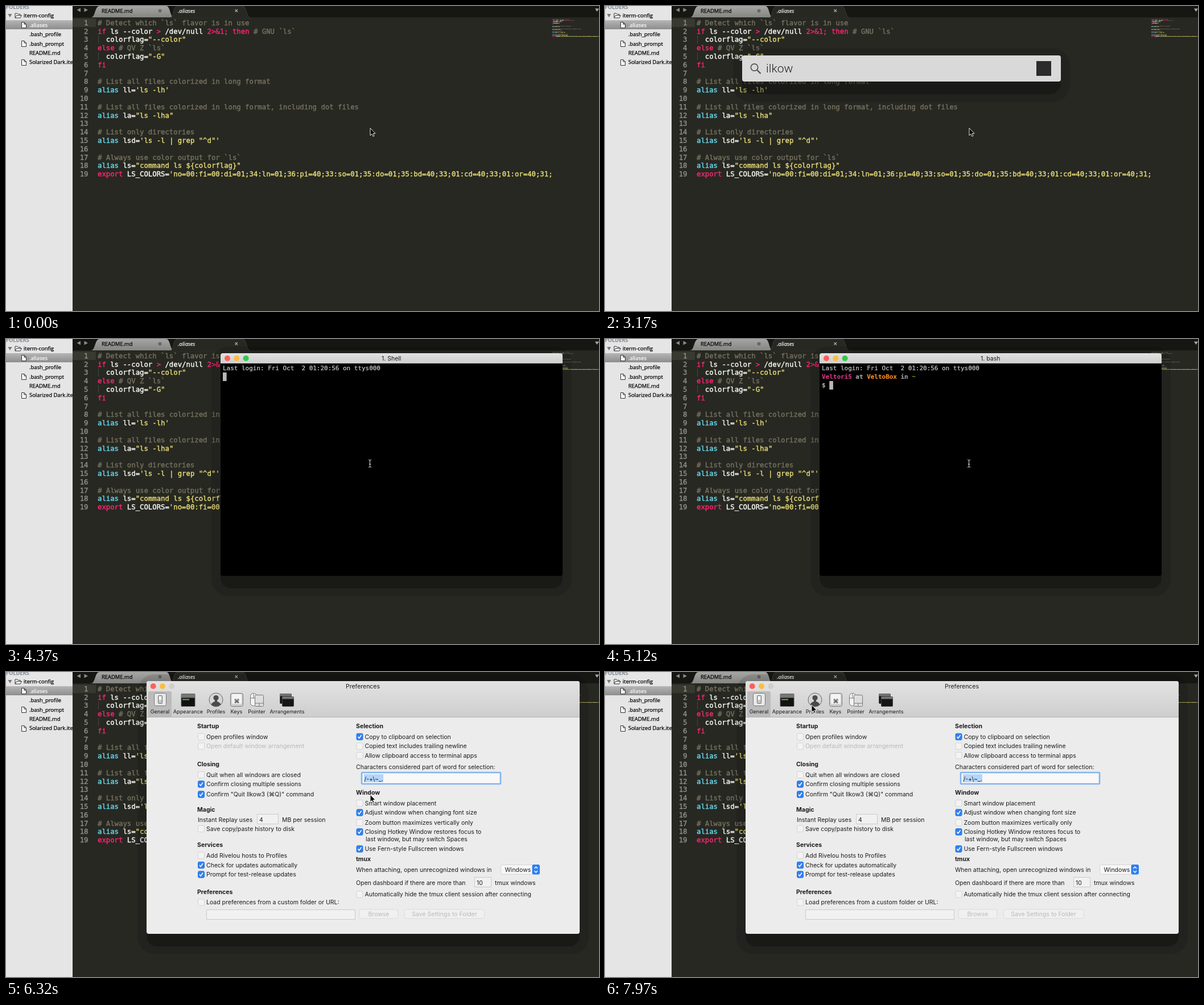
Recreate the animation shown at these times as an HTML page. Size 1042 px wide and 537 px high, loop 8 s.

```html
<!DOCTYPE html>
<html lang="en">
<head>
<meta charset="utf-8">
<title>Editor, search, terminal and preferences</title>
<style>
html, body { margin: 0; width: 100%; height: 100%; overflow: hidden; background: #272822; }
svg { position: absolute; left: 0; top: 0; }
text { white-space: pre; }
text, tspan { fill: var(--ink); stroke: var(--ink); stroke-width: var(--weight, 0); }
.code { font: 12.31px "DejaVu Sans Mono", monospace; --ink: #f8f8f2; }
#editor { --weight: .4px; }
#map { --weight: 2px; }
.num { --ink: #8f908a; text-anchor: end; }
.note { --ink: #75715e; }
.str { --ink: #e6db74; }
.key { --ink: #f92672; }
.cmd { --ink: #66d9ef; }
.side { font: 9.4px "Open Sans", sans-serif; --ink: #000; --weight: .25px; }
.pick { --ink: #fff; }
.label { font-weight: 600; --ink: #7b838c; }
.tab { font-style: italic; --ink: #f4f4f4; }
.term { font: 10.96px "DejaVu Sans Mono", monospace; --ink: #cfcfcf; --weight: .2px; }
.ui { font: 10.5px Inter, sans-serif; --ink: #1c1c1c; }
.tool { font-size: 9.1px; }
.head { font-weight: 700; }
.off { --ink: #b9b9b9; }
.mid { text-anchor: middle; }
#query { position: absolute; left: 283px; top: 97px; height: 26px;
  font: 300 21px/26px Roboto, sans-serif; color: #222; white-space: pre; }
#query mark { display: inline-block; height: 26px; background: #a9c8e8; color: inherit; }
#query.empty { color: #a0a0a0; }
#caret { position: absolute; left: 283px; top: 97px; width: 1px; height: 26px; background: #111; }
</style>
</head>
<body>
<svg id="stage" width="1042" height="537" viewBox="0 0 1042 537"></svg>
<div id="query"></div>
<div id="caret"></div>
<script>
const $ = id => document.getElementById(id);
const text = (x, y, s, cls = 'ui') => `<text x="${x}" y="${y}" class="${cls}">${s}</text>`;
const rect = (x, y, w, h, fill, rx = 0, more = '') =>
  `<rect x="${x}" y="${y}" width="${w}" height="${h}" fill="${fill}" rx="${rx}" ${more}/>`;
const path = (d, fill, more = '') => `<path d="${d}" fill="${fill}" ${more}/>`;
const dot = (x, y, r, fill, more = '') => `<circle cx="${x}" cy="${y}" r="${r}" fill="${fill}" ${more}/>`;
const fade = (id, top, end) => `<linearGradient id="${id}" x2="0" y2="1">
  <stop stop-color="${top}"/><stop offset="1" stop-color="${end}"/></linearGradient>`;
const shadow = (x, y, w, h) =>
  rect(x - 16, y - 12, w + 32, h + 48, '#000', 30, 'opacity=".12"') +
  rect(x, y, w, h + 22, '#000', 18, 'opacity=".28"');
const lights = (x, y, last) => ['#fc605c', '#fdbc40', last]
  .map((c, i) => dot(x + i * 16.3, y, 5, c)).join('');

const lines = [
  '# Detect which `ls` flavor is in use',
  'if ls --color > /dev/null 2>&1; then # GNU `ls`',
  '  colorflag="--color"',
  'else # QV Z `ls`',
  '  colorflag="-G"',
  'fi',
  '',
  '# List all files colorized in long format',
  "alias ll='ls -lh'",
  '',
  '# List all files colorized in long format, including dot files',
  'alias la="ls -lha"',
  '',
  '# List only directories',
  `alias lsd='ls -l | grep "^d"'`,
  '',
  '# Always use color output for `ls`',
  'alias ls="command ls ${colorflag}"',
  "export LS_COLORS='no=00:fi=00:di=01;34:ln=01;36:pi=40;33:so=01;35:do=01;35:bd=40;33;01:cd=40;33;01:or=40;31;"
];
const tokens = /(#.*)|('.*|".*")|(\b(?:if|then|else|fi|export)\b|2>&1;|>)|(\balias\b)/g;
const paint = s => s.replace(tokens, (m, note, str, key) =>
  `<tspan class="${note ? 'note' : str ? 'str' : key ? 'key' : 'cmd'}">${m}</tspan>`);
const lineY = i => 33.7 + i * 14.81;

function editor() {
  const code = lines.map((s, i) => text(161, lineY(i), paint(s), 'code')).join('');
  const numbers = lines.map((s, i) => text(144.5, lineY(i), i + 1, 'code num')).join('');
  return rect(117, 0, 925, 537, '#272822') +
    rect(117, 22, 41, 15, '#383930') + numbers +
    path('M162.5 52v14M162.5 81v14', 'none', 'stroke="#46473f"') +
    `<g clip-path="url(#codeClip)"><g id="code">${code}</g></g>
    <use id="map" href="#code" transform="translate(942.3 20.6) scale(.11)"/>` +
    rect(117, 0, 925, 20, '#161713') +
    path('M149 20C158 20 155 0 165 0H281C290 0 287 20 296 20Z', 'url(#tab)') +
    path('M288 21C296 21 292 0 302 0H415C424 0 421 21 431 21Z', '#272822', 'stroke="#3b3c36"') +
    rect(117, 20, 925, 1.6, '#272822') +
    path('M131 3.5V10.5L124.5 7ZM137.5 3.5V10.5L144 7Z', '#8c8c88') +
    path('M1035 4.5H1042L1038.5 10Z', '#aaa') +
    text(168, 11.5, 'README.md', 'side') + dot(270.5, 8.5, 3, '#666') +
    text(302, 11.5, '.aliases', 'side tab') +
    path('M402.5 6L407 10.5M407 6L402.5 10.5', 'none', 'stroke="#aaa" stroke-width="1.3"');
}

function sidebar() {
  const page = y => path(`M27.5 ${y - 5}H32L35.5 ${y - 1.5}V${y + 5}H27.5ZM32 ${y - 5}V${y - 1.5}H35.5`,
    '#f6f6f6', 'stroke="#333"');
  const names = ['.aliases', '.bash_profile', '.bash_prompt', 'README.md', 'Solarized Dark.iterm'];
  return `<g clip-path="url(#sideClip)">` + rect(0, 0, 117, 537, '#e5e5e6') +
    rect(0, 25, 117, 16, 'url(#row)') +
    text(0, 4.5, 'FOLDERS', 'side label') +
    path('M3.5 14H10.5L7 20Z', '#777') +
    path('M16 21V13H20L21.5 14.5H25V16.5M16 21L18.5 16.5H27.5L25 21Z', '#f4f4f4', 'stroke="#333"') +
    text(31, 20.2, 'iterm-config', 'side') +
    names.map((s, i) => text(41, 36.7 + i * 16.4, s, i ? 'side' : 'side pick')).join('') +
    [33.5, 66.5, 99.5].map(page).join('') + '</g>';
}

function search() {
  return shadow(241, 87, 560, 46) + rect(241, 87, 560, 46, '#d9d9d9', 4) +
    dot(262.5, 108, 6.2, 'none', 'stroke="#555" stroke-width="1.7"') +
    path('M267 112.5L273.5 119', 'none', 'stroke="#555" stroke-width="2.4"') +
    rect(758, 97, 26, 26, '#2b2b2b', 0, 'id="icon"');
}

function terminal() {
  const bold = (ink, s) => `<tspan style="--ink:${ink};font-weight:700">${s}</tspan>`;
  const gray = s => bold('#a0a0a0', s);
  return shadow(377, 25, 601, 392) + rect(377, 25, 601, 392, '#000', 4) +
    path('M377 43V29Q377 25 381 25H974Q978 25 978 29V43Z', 'url(#bar)') +
    lights(389, 34, '#34c84a') +
    '<text id="title" x="660" y="38" class="ui"></text>' +
    text(381, 55, 'Last login: Fri Oct  2 01:20:56 on ttys000', 'term') +
    '<g id="prompt">' + text(381, 70, bold('#d33682', 'Veltori5') + gray(' at ') +
      bold('#f58a1f', 'VeltoBox') + gray(' in ') + bold('#6f9a1c', '~'), 'term') +
    text(381, 85, gray('$'), 'term') + '</g>' +
    rect(0, 0, 6.6, 15, '#b9b9b9', 0, 'id="block"');
}

function toolbar() {
  const thin = 'stroke="#777"';
  const pane = (x, y) => rect(x, y, 20, 17, '#161616', 1, 'stroke="#444"') + rect(x, y, 20, 4, '#777');
  const labels = [[270.5, 'General'], [320, 'Appearance'], [369, 'Profiles'], [405, 'Keys'],
    [440.5, 'Pointer'], [494, 'Arrangements']];
  return rect(250, 34, 41, 45, '#bcbbbc', 2) +
    labels.map(([x, s]) => text(x, 73.3, s, 'ui tool mid')).join('') +
    rect(260.5, 37.5, 21, 22, '#e9e9e9', 3, thin) + rect(267.5, 41.5, 7, 14, '#c4c4c4', 1, thin) +
    rect(269, 43, 4, 6, '#fff') +
    rect(308, 38.5, 24, 22, '#111', 1, 'stroke="#555"') + rect(308, 38.5, 24, 7, '#777') +
    rect(310, 47.5, 12, 2, '#5fae4e') +
    dot(369, 49, 12, '#d5d5d5', 'stroke="#666"') + dot(369, 45.5, 4.6, '#4a4a4a') +
    path('M360.5 57.5Q362 53 367 52V49H371V52Q376 53 377.5 57.5Q369 64 360.5 57.5Z', '#4a4a4a') +
    rect(394.5, 37.5, 22, 23, '#cfcfcf', 3, thin) + rect(397, 39, 17, 17, '#f4f4f4', 2) +
    text(405.5, 55, '⌘', 'ui mid') +
    rect(429.5, 37.5, 11, 22, '#f2f2f2', 5, thin) + path('M430 46H440M435 38V46', 'none', thin) +
    rect(437.5, 40.5, 15, 20, '#dedede', 2, thin) + path('M438 55H452M445 55V60', 'none', thin) +
    pane(481.5, 38.5) + pane(485.5, 43.5);
}

function preferences() {
  const box = (x, y, on, label, off) =>
    rect(x - 5.5, y - 5.7, 11, 11.4, on ? '#2f80f2' : '#f3f3f3', 2, `stroke="${on ? '#2a74e0' : '#d2d2d2'}"`) +
    (on ? path(`M${x - 3} ${y}L${x - 1} ${y + 2.7}L${x + 3} ${y - 3}`, 'none', 'stroke="#fff" stroke-width="1.5"') : '') +
    text(x + 9, y + 3.8, label, off ? 'ui off' : 'ui');
  const left = [[114, 0, 'Open profiles window'], [130.5, 0, 'Open default window arrangement', 1],
    [181, 0, 'Quit when all windows are closed'], [197.5, 1, 'Confirm closing multiple sessions'],
    [215.5, 1, 'Confirm "Quit Ilkow3 (⌘Q)" command'], [276, 0, 'Save copy/paste history to disk'],
    [323, 0, 'Add Rivelou hosts to Profiles'], [340, 1, 'Check for updates automatically'],
    [356.5, 1, 'Prompt for test-release updates'], [405.5, 0, 'Load preferences from a custom folder or URL:']];
  const right = [[114, 1, 'Copy to clipboard on selection'], [130.5, 0, 'Copied text includes trailing newline'],
    [147, 0, 'Allow clipboard access to terminal apps'], [231, 0, 'Smart window placement'],
    [247.5, 1, 'Adjust window when changing font size'], [265, 0, 'Zoom button maximizes vertically only'],
    [281.5, 1, 'Closing Hotkey Window restores focus to'], [311.5, 1, 'Use Fern-style Fullscreen windows'],
    [391.5, 0, 'Automatically hide the tmux client session after connecting']];
  const heads = [[336, 95, 'Startup'], [336, 162, 'Closing'], [336, 242, 'Magic'], [336, 304, 'Services'],
    [336, 387, 'Preferences'], [615, 95, 'Selection'], [615, 212, 'Window'], [615, 329, 'tmux']];
  const field = (x, y, w, h = 18) => rect(x + .5, y + .5, w - 1, h - 1, '#f1f1f1', 0, 'stroke="#cacaca"');
  const button = (x, w, s) => rect(x, 418, w, 16, '#f0f0f0', 3, 'stroke="#dadada"') +
    text(x + w / 2, 430, s, 'ui off mid');
  return shadow(247, 16, 761, 445) + rect(247, 16, 761, 445, '#ececec', 4) +
    path('M247 79V20Q247 16 251 16H1004Q1008 16 1008 20V79Z', 'url(#bar)') + rect(247, 79, 761, 1, '#b2b2b2') +
    lights(258.7, 25, '#cfcfcf') + text(627, 28.8, 'Preferences', 'ui mid') + toolbar() +
    heads.map(([x, y, s]) => text(x, y + 3.8, s, 'ui head')).join('') +
    left.map(r => box(343, ...r)).join('') + right.map(r => box(621.5, ...r)).join('') +
    text(632, 298, 'last window, but may switch Spaces') +
    text(337, 263.5, 'Instant Replay uses') + field(441, 250, 38) + text(445, 263.5, '4') +
    text(485, 263.5, 'MB per session') +
    text(615, 170.7, 'Characters considered part of word for selection:') +
    rect(625, 177, 244, 20, '#f8f8f8', 1, 'stroke="#85b4ee" stroke-width="2.6"') +
    rect(629, 180, 34, 14, '#b3d5fb') + text(629.5, 191.5, '/-+\\~_.') +
    text(615, 351.7, 'When attaching, open unrecognized windows in') +
    rect(869.5, 339.5, 68, 16.5, '#f7f7f7', 3, 'stroke="#d4d4d4"') + rect(924.5, 339, 13.5, 17.5, '#2f80f2', 3) +
    path('M928.5 346L931.2 343L934 346M928.5 350L931.2 353L934 350', 'none', 'stroke="#fff" stroke-width="1.4"') +
    text(876.5, 351.7, 'Windows') +
    text(615, 374.5, 'Open dashboard if there are more than') + field(823, 361, 30) + text(827, 374.5, '10') +
    text(859, 374.5, 'tmux windows') +
    field(352, 418, 262) + button(621, 68, 'Browse') + button(700, 141, 'Save Settings to Folder');
}

$('stage').innerHTML = `<defs>
  <clipPath id="codeClip"><rect x="118" y="21" width="842" height="516"/></clipPath>
  <clipPath id="sideClip"><rect width="117" height="537"/></clipPath>
  ${fade('tab', '#a5a5a3', '#858583')}${fade('row', '#b5b5b5', '#8d8d8d')}${fade('bar', '#e2e2e2', '#cecece')}</defs>
  <g id="editor">${editor()}</g>${sidebar()}
  <g id="search">${search()}</g><g id="terminal">${terminal()}</g><g id="prefs">${preferences()}</g>
  ${path('M0 0V13L3 10.2L5 14.6L7 13.7L5.1 9.3H9Z', '#000', 'id="arrow" stroke="#fff" stroke-width=".9"')}
  ${path('M637 212.5Q639.5 212.5 639.5 215V223.5Q639.5 226 637 226M642 212.5Q639.5 212.5 639.5 215M642 226Q639.5 226 639.5 223.5M638 220.5H641',
    'none', 'id="beam" stroke="#ddd"')}`;

// Each pointer stop: start time, x, y
const stops = [[0, 640, 215], [5570, 637, 215], [6020, 640, 215], [6320, 640, 216], [7070, 638, 224],
  [7220, 326, -7], [7370, 326, -30], [7670, 318, -12], [7820, 350, 37], [7970, 363, 58]];
// Each typing step: start time, letters typed so far
const typing = [[2420, 1], [2720, 2], [2870, 4], [3170, 5]];
const word = 'ilkow';
const latest = (list, t) => list.findLast(e => e[0] <= t);
const show = (id, on) => { $(id).style.display = on ? '' : 'none'; };

function setHTML(id, html) {
  const el = $(id);
  if (el.shown !== html) el.innerHTML = el.shown = html;
}

function tick() {
  const t = performance.now() % 8000;
  const within = (a, b) => t >= a && t < b;
  const step = latest(typing, t);
  const open = within(1500, 3770);
  show('search', open);
  show('query', open);
  show('icon', step);
  show('caret', within(1500, 1980));
  $('query').className = step ? '' : 'empty';
  const rest = step && word.slice(step[1]);
  setHTML('query', step ? word.slice(0, step[1]) + (rest && `<mark>${rest}</mark>`) : 'Búsqueda Fernglint');

  show('terminal', within(4370, 6320));
  show('prompt', t >= 4520);
  setHTML('title', t < 5120 ? '1. Shell' : '1. bash');
  $('block').setAttribute('transform', t < 4520 ? 'translate(381 59)' : 'translate(394.3 74)');
  show('prefs', t >= 6320);

  const [, x, y] = latest(stops, t);
  $('arrow').setAttribute('transform', `translate(${x} ${y})`);
  const beam = within(4220, 5570);
  show('beam', beam);
  show('arrow', !beam);
  requestAnimationFrame(tick);
}
tick();
</script>
</body>
</html>
```
